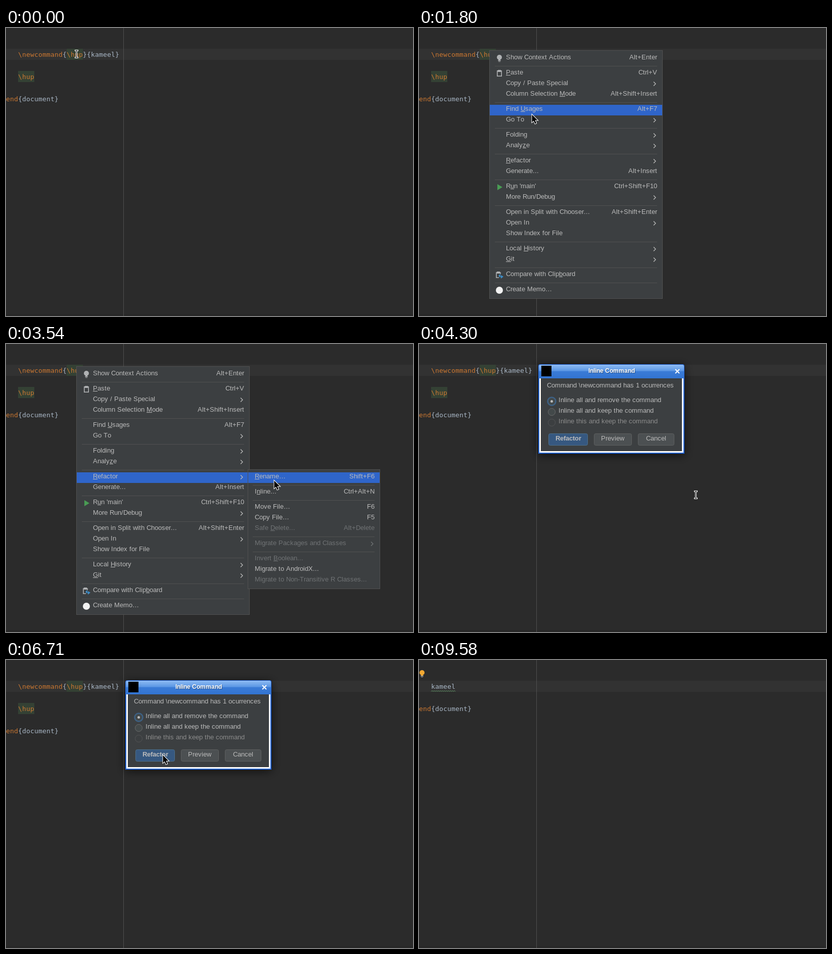
Write an HTML page with a canvas that moves like this. It is 805 by 570 pixels and loops after 9620 ms.

```html
<!DOCTYPE html>
<html lang="en">
<head>
<meta charset="utf-8">
<title>Inline command</title>
<style>
html, body { margin: 0; width: 100%; height: 100%; overflow: hidden; background: #2b2b2b; }
canvas { display: block; }
</style>
</head>
<body>
<canvas id="stage" width="805" height="570"></canvas>
<script>
const ctx = document.getElementById("stage").getContext("2d");
const LOOP = 9620;
const UI = '13px "Liberation Sans", sans-serif';
const UI_BOLD = 'bold 13px "Liberation Sans", sans-serif';
const TITLE = 'bold 12px "Liberation Sans", sans-serif';
const MONO = '13px "DejaVu Sans Mono", monospace';
const COMMAND = "#cc7832", PLAIN = "#a9b7c6", LABEL = "#bbbbbb", FAINT = "#707375";
const BLUE = "#2f65ca", PANEL = "#3c3f41", LINE = "#515151", ICON = "#afb1b3";

const MENU_OPEN = 760, SUBMENU_OPEN = 2260, MENU_CLOSE = 3860;
const DIALOG_OPEN = 4160, DIALOG_CLOSE = 6820, INLINED = 6900;
const TYPO_MARK = 7440, BULB = 7900;

// Pointer stops: time, x, y
const STOPS = [
  [0, 139, 51], [670, 139, 51], [750, 139, 44], [1400, 139, 44], [1800, 223, 171],
  [2240, 257, 258], [2720, 257, 258], [3400, 526, 268], [3540, 530, 270],
  [3780, 540, 290], [4150, 547, 298], [4980, 547, 298], [5540, 300, 206],
  [5900, 328, 194], [6560, 310, 188], [7640, 310, 188], [8260, -16, 388]
];

// Entries: label (underscore before the mnemonic), shortcut or ">", icon, disabled
const MAIN = {
  x: 139, y: 44, w: 343, textX: 172, right: 471, ruleX: 150,
  items: [
    ["Show Context Actions", "Alt+Enter", greyBulb], null,
    ["_Paste", "Ctrl+V", clipboard], ["Copy / Paste Special", ">"],
    ["Column Selection _Mode", "Alt+Shift+Insert"], null,
    ["Find _Usages", "Alt+F7"], ["Go To", ">"], null,
    ["Folding", ">"], ["Analy_ze", ">"], null,
    ["_Refactor", ">"], ["Generate...", "Alt+Insert"], null,
    ["R_un 'main'", "Ctrl+Shift+F10", runMark], ["More Run/Debug", ">"], null,
    ["Open in Split with Chooser...", "Alt+Shift+Enter"], ["Open In", ">"],
    ["Show Index for File"], null,
    ["Local _History", ">"], ["_Git", ">"], null,
    ["Compare with Clip_board", "", compareMark], null,
    ["Create Memo…", "", disc]
  ]
};
const SUB = {
  x: 478, y: 248, w: 262, textX: 492, right: 729, ruleX: 488,
  items: [
    ["_Rename…", "Shift+F6"], null, ["I_nline...", "Ctrl+Alt+N"], null,
    ["Move File…", "F6"], ["Copy File…", "F5"],
    ["Safe _Delete...", "Alt+Delete", null, true], null,
    ["Migrate Packages and Classes", ">", null, true], null,
    ["Invert _Boolean...", "", null, true], ["Migrate to AndroidX..."],
    ["Migrate to Non-Transitive R Classes...", "", null, true]
  ]
};

function rect(x, y, w, h, color) {
  ctx.fillStyle = color;
  ctx.fillRect(x, y, w, h);
}

function path(points, { fill, stroke, width = 1, close = false }) {
  ctx.beginPath();
  points.forEach(([x, y]) => ctx.lineTo(x, y));
  if (close) ctx.closePath();
  if (stroke) { ctx.strokeStyle = stroke; ctx.lineWidth = width; ctx.stroke(); }
  if (fill) { ctx.fillStyle = fill; ctx.fill(); }
}

function circle(x, y, r, fill, stroke, width = 1) {
  ctx.beginPath();
  ctx.arc(x, y, r, 0, Math.PI * 2);
  if (fill) { ctx.fillStyle = fill; ctx.fill(); }
  if (stroke) { ctx.strokeStyle = stroke; ctx.lineWidth = width; ctx.stroke(); }
}

// Glyphs advance by whole pixels, as hinted desktop text does.
const advance = c => Math.floor(ctx.measureText(c).width + 0.51);

function text(str, x, y, color, font = UI, alignRight = false) {
  ctx.font = font;
  ctx.fillStyle = color;
  if (alignRight) for (const c of str) x -= advance(c);
  let underline = false;
  for (const c of str) {
    if (c === "_") { underline = true; continue; }
    const w = advance(c);
    ctx.fillText(c, x, y);
    if (underline) ctx.fillRect(x, y + 1, w, 1);
    underline = false;
    x += w;
  }
  return x;
}

function code(x, y, ...parts) {
  for (const part of parts) {
    x = text(part, x, y, /^(\\|end)/.test(part) ? COMMAND : PLAIN, MONO);
  }
}

function bulb(x, y, color) {
  circle(x, y, 5, color);
  rect(x - 2, y + 3, 4, 3, color);
  rect(x - 3, y + 6, 6, 1, ICON);
  rect(x - 2, y + 8, 4, 1, ICON);
}

function greyBulb(y) { bulb(159, y + 8, ICON); }

function clipboard(y) {
  ctx.strokeStyle = ICON;
  ctx.lineWidth = 1.6;
  ctx.strokeRect(154.8, y + 4.8, 8.4, 10.4);
  rect(156, y + 3, 6, 4, ICON);
}

function runMark(y) {
  path([[155, y + 4], [165, y + 10], [155, y + 16]], { fill: "#499c54", close: true });
}

function compareMark(y) {
  path([[158, y + 15], [153, y + 15], [153, y + 5], [161, y + 5], [161, y + 8]],
    { stroke: ICON, width: 1.6 });
  rect(154, y + 3, 6, 4, ICON);
  path([[161, y + 8], [157, y + 11], [161, y + 14]], { fill: "#3d8ec9", close: true });
  path([[162, y + 10], [167, y + 13], [162, y + 17]], { fill: "#3d8ec9", close: true });
  rect(158, y + 13, 5, 1, "#3d8ec9");
}

function disc(y) { circle(159, y + 10, 7, "#f2f2f2"); }

function drawMenu(menu, pointer, pinned) {
  const height = menu.items.reduce((h, item) => h + (item ? 21 : 9), 12);
  rect(menu.x, menu.y, menu.w, height, LINE);
  rect(menu.x + 1, menu.y + 1, menu.w - 2, height - 2, PANEL);
  let y = menu.y + 6;
  for (const item of menu.items) {
    if (!item) {
      rect(menu.ruleX, y + 4, menu.right - menu.ruleX, 1, LINE);
      y += 9;
      continue;
    }
    const [label, shortcut, icon, disabled] = item;
    const inside = pointer.x > menu.x && pointer.x < menu.x + menu.w
      && pointer.y >= y && pointer.y < y + 21;
    if (inside || label === pinned) rect(menu.x + 1, y, menu.w - 2, 21, BLUE);
    const color = disabled ? FAINT : LABEL;
    text(label, menu.textX, y + 12, color);
    if (icon) icon(y);
    if (shortcut === ">") {
      const x = menu.right - 7;
      path([[x, y + 5.5], [x + 4, y + 9.5], [x, y + 13.5]], { stroke: color, width: 1.3 });
    } else if (shortcut) {
      text(shortcut, menu.right, y + 12, color, UI, true);
    }
    y += 21;
  }
}

function button(x, w, label, textX, main) {
  ctx.beginPath();
  ctx.roundRect(x + 0.5, 177.5, w - 1, 23, 3);
  ctx.fillStyle = main ? "#365880" : "#4c5052";
  ctx.fill();
  ctx.strokeStyle = main ? "#4c708c" : "#5e6060";
  ctx.lineWidth = 1;
  ctx.stroke();
  text(label, textX, 191, LABEL, main ? UI_BOLD : UI);
}

function drawDialog() {
  ctx.save();
  ctx.shadowColor = "rgba(0,0,0,.65)";
  ctx.shadowBlur = 18;
  ctx.shadowOffsetY = 3;
  ctx.beginPath();
  ctx.roundRect(236, 40, 289, 177, [4, 4, 0, 0]);
  ctx.fillStyle = "#1f62d6";
  ctx.fill();
  ctx.restore();

  const shine = ctx.createLinearGradient(0, 41, 0, 68);
  [[0, "#8fbcf3"], [0.45, "#5a96e4"], [0.5, "#3a7bd6"], [1, "#3274d2"]]
    .forEach(([at, color]) => shine.addColorStop(at, color));
  ctx.beginPath();
  ctx.roundRect(237, 41, 287, 27, [3, 3, 0, 0]);
  ctx.fillStyle = shine;
  ctx.fill();
  rect(238, 68, 285, 147, "#ffffff");
  rect(241, 68, 279, 144, PANEL);

  rect(242, 43, 20, 21, "#000000");
  text("Inline Command", 336, 58, "rgba(0,0,0,.4)", TITLE);
  text("Inline Command", 335, 57, "#ffffff", TITLE);
  path([[507, 50], [515, 58]], { stroke: "#ffffff", width: 2 });
  path([[515, 50], [507, 58]], { stroke: "#ffffff", width: 2 });

  text("Command \\newcommand has 1 ocurrences", 253, 86, LABEL);
  circle(262.5, 113.5, 8, "#43494a", "#3d6185", 2.5);
  circle(262.5, 113.5, 2.5, LABEL);
  circle(262.5, 134.5, 7, "#43494a", "#6b6b6b");
  circle(262.5, 155.5, 7, null, "#545556");
  text("Inline all and remove the command", 276, 115, LABEL);
  text("Inline all and keep the command", 276, 136, LABEL);
  text("Inline this and keep the command", 276, 157, "#8c8c8c");
  button(256, 78, "Refactor", 270, true);
  button(346, 75, "Preview", 360);
  button(433, 72, "Cancel", 449);
}

function drawEditor(t) {
  rect(0, 0, 805, 570, "#2b2b2b");
  rect(0, 41, 805, 22, "#323232");
  rect(0, 566, 805, 4, "#282828");
  rect(232, 0, 1, 570, "#4f4f4f");
  if (t < INLINED) {
    rect(120, 41, 32, 22, "#344134");
    rect(24, 85, 32, 22, "#344134");
    code(24, 57, "\\newcommand", "{", "\\hup", "}{kameel}");
    code(24, 101, "\\hup");
    code(0, 145, "end", "{document}");
    return;
  }
  code(24, 57, "kameel");
  code(0, 101, "end", "{document}");
  if (t >= TYPO_MARK) {
    const wave = Array.from({ length: 25 }, (_, i) => [24 + i * 2, i % 2 ? 60.5 : 62.5]);
    path(wave, { stroke: "#659c6b" });
  }
  if (t >= BULB) bulb(6, 25, "#f0a732");
}

function pointerAt(t) {
  const next = STOPS.findIndex(stop => stop[0] > t);
  if (next < 0) return { x: -16, y: 388 };
  const [t0, x0, y0] = STOPS[next - 1], [t1, x1, y1] = STOPS[next];
  const p = (t - t0) / (t1 - t0), ease = p * p * (3 - 2 * p);
  return { x: Math.round(x0 + (x1 - x0) * ease), y: Math.round(y0 + (y1 - y0) * ease) };
}

function drawArrow({ x, y }) {
  const outline = [[0, 0], [0, 15], [3.5, 12], [6, 18], [8.5, 17], [6, 11], [11, 11]];
  path(outline.map(([dx, dy]) => [x + dx + 0.5, y + dy + 0.5]),
    { fill: "#000000", stroke: "#ffffff", width: 2, close: true });
}

function drawBeam({ x, y }) {
  for (const [grow, color] of [[1, "#ffffff"], [0, "#000000"]]) {
    for (const [dx, dy, w, h] of [[-2, -7, 5, 1], [0, -7, 1, 15], [-2, 7, 5, 1]]) {
      rect(x + dx - grow, y + dy - grow, w + 2 * grow, h + 2 * grow, color);
    }
  }
}

// Opacity of a window that fades in and out around its visible span
function fade(t, open, close) {
  const clamp = v => Math.max(0, Math.min(1, v));
  return clamp((t - open) / 120) * clamp(1 - (t - close) / 120);
}

function draw(t) {
  const pointer = pointerAt(t);
  const menuAlpha = fade(t, MENU_OPEN, MENU_CLOSE);
  const dialogAlpha = fade(t, DIALOG_OPEN, DIALOG_CLOSE);
  drawEditor(t);

  const subOpen = t >= SUBMENU_OPEN;
  if (menuAlpha) {
    ctx.globalAlpha = menuAlpha;
    drawMenu(MAIN, pointer, subOpen && "_Refactor");
    if (subOpen) drawMenu(SUB, pointer);
  }
  if (dialogAlpha) {
    ctx.globalAlpha = dialogAlpha;
    drawDialog();
  }
  ctx.globalAlpha = 1;

  const overMenu = t >= MENU_OPEN && t < MENU_CLOSE;
  const overDialog = t >= DIALOG_OPEN && t < DIALOG_CLOSE
    && pointer.x > 236 && pointer.x < 525 && pointer.y < 217;
  (overMenu || overDialog ? drawArrow : drawBeam)(pointer);
}

function tick(now) {
  draw(now % LOOP);
  requestAnimationFrame(tick);
}
draw(0);
requestAnimationFrame(tick);
</script>
</body>
</html>
```
